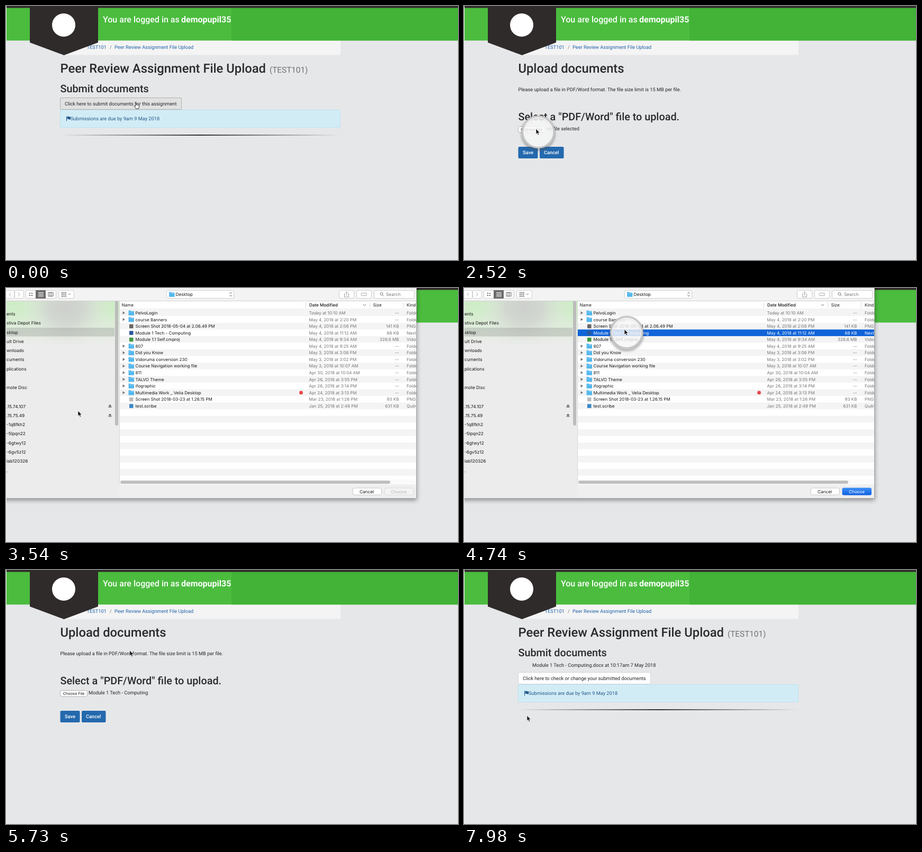
An HTML page for the animation above (8000 ms loop, 854 by 480 pixels).

```html
<!DOCTYPE html>
<html lang="en">
<head>
<meta charset="utf-8">
<title>Peer review file upload</title>
<style>
  html, body { margin: 0; width: 100%; height: 100%; overflow: hidden; background: #e6e7e9; }
  svg { display: block; width: 100%; height: 100%; }
  text { font-family: Roboto, sans-serif; font-size: 9.23px; fill: #242424; white-space: pre; text-rendering: geometricPrecision; }
  .h1 { font-size: 23.75px; font-weight: 500; fill: #2a2a2c; }
  .h2 { font-size: 19.8px; font-weight: 500; fill: #2a2a2c; }
  .sub { font-size: 15.3px; fill: #707070; }
  .user { font-size: 16px; font-weight: 500; fill: #fff; }
  .bold { font-weight: 700; }
  .link { fill: #1f61a8; }
  .info { fill: #24598a; }
  .white { fill: #fff; font-weight: 500; }
  .mac { font-family: Inter, sans-serif; font-size: 8.05px; fill: #161616; }
  .side { font-size: 8.3px; }
  .dim { fill: #757575; }
  .strong { font-weight: 500; }
  .end { text-anchor: end; }
  .mid { text-anchor: middle; }
  .selected text { fill: #fff; }
</style>
</head>
<body>
<svg id="stage" viewBox="0 0 854 480"></svg>
<script>
const LOOP = 8000, STEP = 30;
const PAGE_OPEN = 1000, PAGE_SAVED = 7500;
const SHEET_DOWN = [2850, 3150], SHEET_UP = [5057, 5332], SHEET_TRAVEL = 404;
const ROW_PICKED = 4500;
const CLICKS = [[2300, 2760], [4450, 4950], [6230, 6850]];
// time, x, y of the pointer tip
const POINTER = [[0, 245, 182], [1500, 245, 182], [2220, 136, 232], [3700, 136, 232],
  [4380, 303, 78], [5430, 303, 78], [6150, 119, 275], [8000, 119, 275]];

const rect = (x, y, w, h, fill, more = '') =>
  `<rect x="${x}" y="${y}" width="${w}" height="${h}" fill="${fill}" ${more}/>`;
const text = (x, y, label, cls = '') => `<text x="${x}" y="${y}" class="${cls}">${label}</text>`;
const path = (d, fill, more = '') => `<path d="${d}" fill="${fill}" ${more}/>`;
const line = (d, color = '#666', w = 1) => path(d, 'none', `stroke="${color}" stroke-width="${w}"`);
const group = (id, body) => `<g id="${id}">${body}</g>`;
const box = (x, y, w, h, fill = '#fff', stroke = '#cfcfcf', r = 2.5) =>
  rect(x + .5, y + .5, w - 1, h - 1, fill, `rx="${r}" stroke="${stroke}"`);

const defs = `<defs>
  <linearGradient id="rule"><stop stop-color="#333" stop-opacity="0"/><stop offset=".5" stop-color="#333"/>
    <stop offset="1" stop-color="#333" stop-opacity="0"/></linearGradient>
  <linearGradient id="tint" x2="0" y2="1"><stop stop-color="#c9ecc1"/><stop offset=".4" stop-color="#d0edc9"/>
    <stop offset=".75" stop-color="#e2ecdf"/><stop offset="1" stop-color="#ececec"/></linearGradient>
  <radialGradient id="blob"><stop stop-color="#cdcfcc"/><stop offset=".4" stop-color="#d2d5d1" stop-opacity=".9"/>
    <stop offset="1" stop-color="#e4e8e2" stop-opacity="0"/></radialGradient>
  <linearGradient id="blue" x2="0" y2="1"><stop stop-color="#4090f6"/><stop offset="1" stop-color="#0f60e2"/></linearGradient>
  <clipPath id="sheetClip"><rect x="1" y="-10" width="774" height="407"/></clipPath>
  <clipPath id="sideClip"><rect x="1" y="25" width="213" height="372"/></clipPath>
  <filter id="soft" x="-10%" y="-10%" width="120%" height="120%"><feGaussianBlur stdDeviation="4"/></filter>
  <filter id="lensShade" x="-50%" y="-50%" width="200%" height="200%"><feGaussianBlur stdDeviation="2"/></filter>
</defs>`;

const chrome =
  rect(0, 0, 854, 480, '#e6e7e9') +
  rect(102, 62, 530, 30.5, '#f4f4f4', 'rx="3"') +
  text(152.5, 80.5, 'TEST101', 'link') + text(196, 80.5, '/', 'dim') +
  text(205, 80.5, 'Peer Review Assignment File Upload', 'link') +
  rect(0, 3, 854, 62.3, '#4bbc3e') + rect(426, 3, 428, 62.3, '#42b337', 'id="flatGreen"') +
  rect(0, 0, 854, 3.6, '#302b2b') +
  text(183, 31, 'You are logged in as', 'user') + text(331, 31, 'demopupil35', 'user bold') +
  path('M45 0H174V69L109.500 93L45 69Z', '#302b2b') +
  '<circle cx="109" cy="36" r="22" fill="#fff"/>';

function submitPage(id, button, width, shift, fill, stroke, listing = '') {
  return group(id,
    text(102.5, 126, 'Peer Review Assignment File Upload', 'h1') + text(498, 126, '(TEST101)', 'sub') +
    text(102.5, 163, 'Submit documents', 'h2') + listing +
    `<g transform="translate(0 ${shift})">` +
    box(102, 196, 530, 34, '#d2ecf6', '#bde2ee', 2) +
    box(102, 173, width, 23, fill, stroke, 1.5) + text(111, 187.5, button) +
    path('M114 208.500h1v9h-1zM115.500 209q1.800-1 3.300 0t3.200 0v5q-1.700 1-3.200 0t-3.300 0z', '#24598a') +
    text(122, 216, 'Submissions are due by 9am 9 May 2018', 'info') +
    rect(102, 243, 530, 2, 'url(#rule)') + '</g>');
}

const uploadPage = group('upload',
  text(102.5, 126, 'Upload documents', 'h1') +
  text(102.5, 161, 'Please upload a file in PDF/Word format. The file size limit is 15 MB per file.') +
  text(102.5, 215.5, 'Select a "PDF/Word" file to upload.', 'h2') +
  box(102, 227, 52, 12.5, '#fff', '#b0b0b0', 3) +
  '<text x="128" y="236" class="mac mid" style="font-size:7.3px">Choose File</text>' +
  '<text id="fileName" x="156" y="235"></text>' +
  rect(102.5, 266, 37, 22, '#2469ae', 'rx="2"') + text(111, 280.3, 'Save', 'white') +
  rect(143, 266, 45.5, 22, '#2469ae', 'rx="2"') + text(151, 280.3, 'Cancel', 'white'));

// name, date, size, kind, icon colour (folders leave the last three out)
const files = [
  ['PelvoLogin', 'Today at 10:10 AM'],
  ['course Banners', 'May 4, 2018 at 2:20 PM'],
  ['Screen Shot 2018-05-04 at 2.06.49 PM', 'May 4, 2018 at 2:06 PM', '141 KB', 'PNG image', '#666'],
  ['Module 1 Tech - Computing', 'May 4, 2018 at 11:12 AM', '68 KB', 'Nextr', '#2b579a'],
  ['Module 1.1 Self.cmproj', 'May 4, 2018 at 9:34 AM', '326.6 MB', 'Vidor', '#3d9a3d'],
  ['807', 'May 4, 2018 at 9:25 AM'],
  ['Did you Know', 'May 3, 2018 at 3:06 PM'],
  ['Vidoruma conversion 230', 'May 3, 2018 at 3:02 PM'],
  ['Course Navigation working file', 'May 3, 2018 at 10:07 AM'],
  ['811', 'Apr 30, 2018 at 10:04 AM'],
  ['TALVO Theme', 'Apr 26, 2018 at 3:55 PM'],
  ['ifographic', 'Apr 26, 2018 at 3:14 PM'],
  ['Multimedia Work _ Velia Desktop', 'Apr 24, 2018 at 3:13 PM'],
  ['Screen Shot 2018-03-23 at 1.26.15 PM', 'Mar 23, 2018 at 1:26 PM', '93 KB', 'PNG image', '#bbb'],
  ['test.scribe', 'Jan 25, 2018 at 2:49 PM', '631 KB', 'Quilm', '#3b86c8']];
const ROW = 12.56;

const folder = (x, y) => path(`M${x} ${y - 4.5}h4l1 1.200h5.500v8h-10.500z`, '#55b7ec') +
  rect(x, y - 2, 10.5, .7, '#8fd3f6');

function fileRow([name, date, size = '--', kind = 'Folder', icon], i) {
  const y = 47 + i * ROW;
  const mark = icon ? rect(233, y - 3.5, 7.5, 7.5, icon)
    : path(`M220.500 ${y - 2.8}l4.500 2.800l-4.500 2.800z`, '#777') + folder(231.5, y);
  return group('row' + i, rect(214, y - ROW / 2, 561, ROW, i % 2 ? '#fff' : '#f4f4f4') + mark +
    text(244.5, y + 3, name, 'mac') + text(572.5, y + 3, date, 'mac dim') +
    text(742.5, y + 3, size, 'mac dim end') + text(757, y + 3, kind, 'mac dim'));
}

const places = [['ents', 49], ['stiva Depot Files', 66], ['sktop', 83.5], ['ult Drive', 101], ['wnloads', 118],
  ['cuments', 135], ['plications', 152.5], ['mote Disc', 188], ['.15.74.107', 223.5], ['.15.75.49', 241],
  ['-1q8fkh2', 258], ['-5lpqn22', 275], ['-6gtwy12', 292.5], ['-6gv5z12', 309.5], ['lab120326', 327], ['.', 345]];
const eject = y => path(`M193.500 ${y}l3-3.500l3 3.500zM193.500 ${y + 1}h6v1.200h-6z`, '#555');

const sidebar =
  rect(1, 25, 213, 372, '#ececec') +
  // the tint is the page shining through, so it stays put while the sheet slides
  group('glow', rect(1, 0, 213, 108, 'url(#tint)') +
    '<ellipse cx="114" cy="36" rx="88" ry="78" fill="url(#blob)"/>') +
  rect(1, 75, 204, 16.5, '#8a8f8a', 'opacity=".32"') +
  places.map(([label, y]) => text(1, y + 3, label, 'mac side')).join('') +
  eject(223.5) + eject(241) + rect(206, 20, 6, 240, '#bcbcbc', 'rx="3"');

const dots = (x, y, cols, rows, step) => Array.from({ length: cols * rows }, (_, i) =>
  rect(x + i % cols * step, y + (i / cols | 0) * step, 2, 2, '#666')).join('');

const toolbar =
  rect(1, -10, 774, 35, '#f3f3f3') + rect(1, 24, 774, 1, '#d2d2d2') +
  box(-4, 4, 20, 16) + box(16, 4, 18, 16) + line('M9 8.500l-3 3.500l3 3.500M23 8.500l3 3.500l-3 3.500', '#aaa') +
  box(37, 4, 58, 16) + rect(56, 4, 19, 16, '#6b6b6b') +
  dots(44, 9, 2, 2, 4) + line('M61 8.500h10M61 11h10M61 13.500h10M61 16h10', '#fff') +
  line('M80 8.500h9v7h-9zM83 8.500v7M86 8.500v7') +
  box(99, 4, 30, 16) + dots(105, 8, 3, 3, 3.3) + line('M118 10.500l2 2l2-2') +
  box(303, 4, 128, 16) + folder(308, 12) + text(320.5, 15, 'Desktop', 'mac side') +
  line('M422.500 10.500l2-2.200l2 2.200M422.500 13.500l2 2.200l2-2.200', '#555') +
  box(629, 4, 29, 16) + line('M641 11h-1.500v6h8v-6h-1.500M643.500 14v-7M641.500 9l2-2l2 2', '#888', .8) +
  box(662, 4, 29, 16) + line('M672 9.500h9v5h-9l-1.500-2.500z', '#999', .8) +
  box(695, 4, 77, 16) + '<circle cx="709.500" cy="11" r="2.500" fill="none" stroke="#777"/>' +
  line('M711.500 13l2.500 2.500', '#777') + text(718, 15, 'Search', 'mac side dim');

const listing =
  rect(214, 25, 561, 347, '#fff') +
  text(218.5, 34.5, 'Name', 'mac') + text(573, 34.5, 'Date Modified', 'mac strong') +
  text(693.5, 34.5, 'Size', 'mac') + text(757, 34.5, 'Kind', 'mac') +
  line('M675 31l2.500 2.500l2.500-2.500') +
  line('M566.500 27v11M687.500 27v11M750.500 27v11', '#ddd') + rect(214, 39.5, 561, .7, '#ddd') +
  files.map(fileRow).join('') +
  Array.from({ length: 5 }, (_, i) =>
    rect(214, 47 + (16 + 2 * i) * ROW - ROW / 2, 561, ROW, '#f4f4f4')).join('') +
  '<circle cx="557.500" cy="197.700" r="3.500" fill="#e8474c"/>' +
  rect(214, 362, 561, 10, '#fafafa') + rect(216, 364, 510, 6, '#bfbfbf', 'rx="3"') +
  rect(214, 25, 1, 347, '#d8d8d8') +
  rect(214, 371.5, 561, 25.5, '#efefef') +
  box(654.5, 377.5, 55.5, 14, '#fff', '#c8c8c8', 3) + text(681.5, 387.5, 'Cancel', 'mac side mid') +
  box(714.5, 377.5, 55.5, 14, '#f4f4f4', '#dcdcdc', 3) +
  rect(714.5, 377.5, 55.5, 14, 'url(#blue)', 'rx="3" id="chooseFill"') +
  '<text id="choose" x="742" y="387.500" class="mac side mid">Choose</text>';

const sheet = group('sheet',
  rect(-8, -10, 784, 411, '#000', 'opacity=".4" filter="url(#soft)"') +
  rect(1, -10, 775, 408, '#a9a9a9') +
  `<g clip-path="url(#sheetClip)"><g clip-path="url(#sideClip)">${sidebar}</g>${toolbar}${listing}</g>`);

const lens = group('lens',
  '<circle cy="3" r="30" fill="none" stroke="#555" stroke-opacity=".55" stroke-width="4" filter="url(#lensShade)"/>' +
  '<circle r="30" fill="#f7f7f7" fill-opacity=".82"/>' +
  '<circle r="29.500" fill="none" stroke="#c6c6c6" stroke-width="3.500"/>' +
  '<circle r="27.500" fill="none" stroke="#fff" stroke-opacity=".8" stroke-width="1"/>');

const outline = 'stroke="#fff" stroke-width=".7" stroke-linejoin="round"';
const pointer = group('pointer',
  group('arrow', path('M0 0V10.200L2.300 8.100L3.900 11.800L5.700 11L4.100 7.400H7.200Z', '#111', outline)) +
  group('hand', path('M-.2 1.500q.9-1.300 1.800 0v3.500q1-.6 1.700.2q1-.4 1.600.4q1.200-.3 1.500.9v2.800l-1 2.700h-4.800' +
    'q-1.300-2.300-3.200-4.300q-.3-1.400 1-1.200l1.400 1.200z', '#fff', 'stroke="#222" stroke-width=".9" stroke-linejoin="round"')));

document.getElementById('stage').innerHTML = defs + chrome +
  submitPage('before', 'Click here to submit documents for this assignment', 230, 0, '#e1e1e1', '#b0b0b0') +
  uploadPage +
  submitPage('after', 'Click here to check or change your submitted documents', 251, 20, '#fff', '#d4d4d4',
    text(129, 183, 'Module 1 Tech - Computing.docx at 10:17am 7 May 2018')) +
  sheet + rect(0, 0, 1, 480, '#f6f6f6') + lens + pointer;

const el = id => document.getElementById(id);
const show = (id, on) => { el(id).style.display = on ? '' : 'none'; };
const move = (id, x, y, scale = 1) => el(id).setAttribute('transform', `translate(${x} ${y}) scale(${scale})`);
const clamp = v => Math.min(1, Math.max(0, v));
const ease = (t, from, to) => { const p = clamp((t - from) / (to - from)); return p * p * (3 - 2 * p); };

function pointerAt(t) {
  const i = POINTER.findIndex(stop => stop[0] > t);
  const [t0, x0, y0] = POINTER[i - 1], [t1, x1, y1] = POINTER[i];
  const p = ease(t, t0, t1);
  return [x0 + (x1 - x0) * p, y0 + (y1 - y0) * p];
}

function draw(t) {
  show('before', t < PAGE_OPEN);
  show('upload', t >= PAGE_OPEN && t < PAGE_SAVED);
  show('after', t >= PAGE_SAVED);
  el('fileName').textContent = t < SHEET_UP[0] ? 'no file selected' : 'Module 1 Tech - Computing';

  const sheetOpen = t >= SHEET_DOWN[0] && t < SHEET_UP[1];
  const slide = SHEET_TRAVEL * (ease(t, ...SHEET_DOWN) - 1 - ease(t, ...SHEET_UP));
  show('sheet', sheetOpen);
  show('flatGreen', !sheetOpen);
  move('sheet', 0, Math.round(slide));
  move('glow', 0, -Math.round(slide));

  const picked = t >= ROW_PICKED;
  el('row3').setAttribute('class', picked ? 'selected' : '');
  el('row3').firstChild.setAttribute('fill', picked ? '#1063d8' : '#fff');
  show('chooseFill', picked);
  el('choose').style.fill = picked ? '#fff' : '#b5b5b5';

  const [x, y] = pointerAt(t);
  const overButton = t < PAGE_OPEN || (t > 6000 && t < PAGE_SAVED);
  move('pointer', x, y);
  show('hand', overButton);
  show('arrow', !overButton);

  const click = CLICKS.find(([from, to]) => t >= from && t < to);
  show('lens', click);
  if (click) {
    const level = Math.min(clamp((t - click[0]) / 130), clamp((click[1] - t) / 150));
    move('lens', x + 4.3, y + 6, .6 + .4 * level);
    el('lens').setAttribute('opacity', level);
  }
}

function tick() {
  const t = performance.now() % LOOP;
  draw(t - t % STEP);
  requestAnimationFrame(tick);
}
tick();
</script>
</body>
</html>
```
